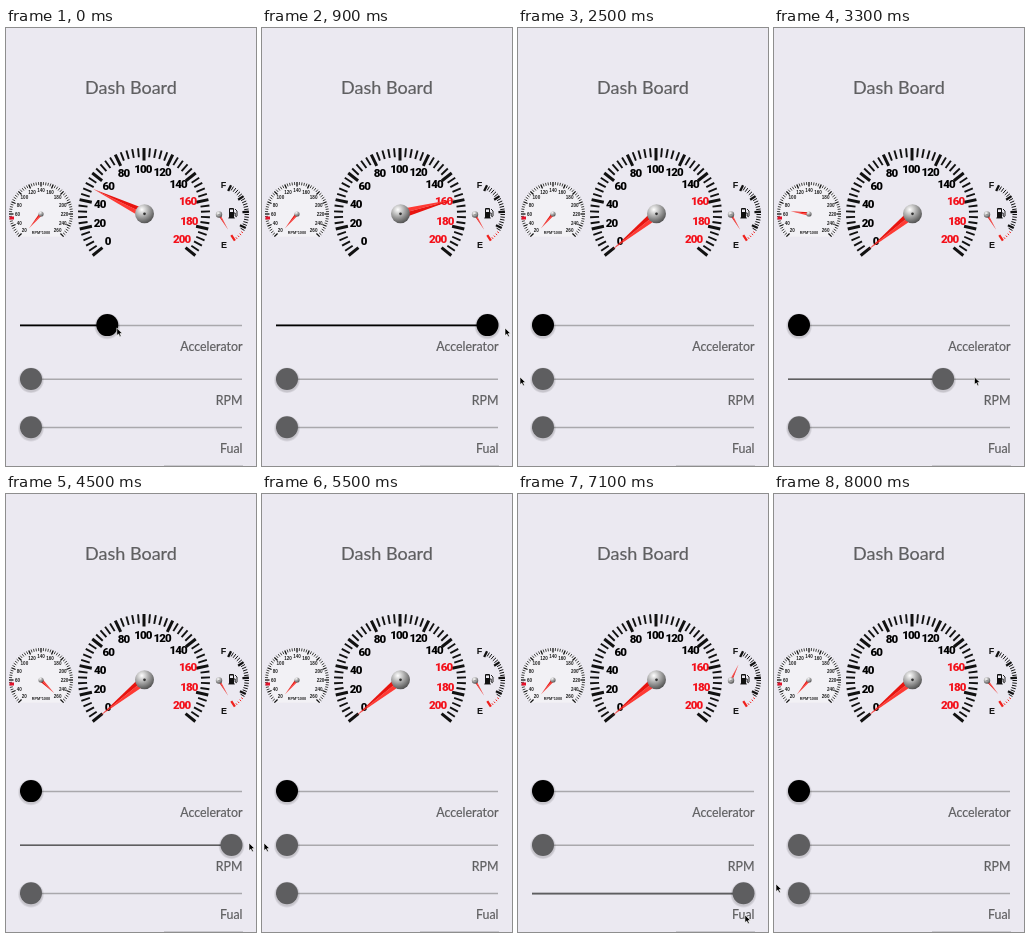
An HTML page that plays this animation: 250 px wide and 438 px high, repeating every 8100 ms.

```html
<!DOCTYPE html>
<html>
<head>
<meta charset="utf-8">
<style>
html, body { margin: 0; height: 100%; overflow: hidden; background: #ebe9f1; }
svg { display: block; width: 100vw; height: 100vh; }
text { font-family: Lato, sans-serif; fill: #5f5f61; }
.title { font-size: 18px; text-anchor: middle; stroke: #5f5f61; stroke-width: .2px; }
.label { font-size: 12.4px; text-anchor: end; stroke: #5f5f61; stroke-width: .2px; }
.num { font: 900 11.5px Roboto, sans-serif; letter-spacing: -.9px; text-anchor: middle; }
.tiny { font: 700 4.6px "Liberation Sans", sans-serif; text-anchor: middle; fill: #222; }
.mark { font: 700 9px "Liberation Sans", sans-serif; text-anchor: middle; fill: #111; }
</style>
</head>
<body>
<svg id="stage" viewBox="0 0 250 438">
  <defs>
    <radialGradient id="metal" cx=".36" cy=".28" r=".8">
      <stop offset="0" stop-color="#fff"/>
      <stop offset=".45" stop-color="#aaa"/>
      <stop offset="1" stop-color="#444"/>
    </radialGradient>
  </defs>
  <text x="125" y="66.3" class="title">Dash Board</text>
  <path d="M158 437.5H237" stroke="#cac9cf"/>
</svg>
<script>
const stage = document.getElementById('stage');
const LOOP = 8100, STEP = 100, RED = '#f0201c';

function add(tag, attrs, text) {
  const el = document.createElementNS('http://www.w3.org/2000/svg', tag);
  for (const k in attrs) el.setAttribute(k, attrs[k]);
  if (text !== undefined) el.textContent = text;
  return stage.appendChild(el);
}

function polar(cx, cy, r, deg) {
  const a = deg * Math.PI / 180;
  return [cx + r * Math.cos(a), cy + r * Math.sin(a)];
}

function tick(cx, cy, r1, r2, deg, width, stroke = '#111') {
  add('path', {
    d: `M${polar(cx, cy, r1, deg)}L${polar(cx, cy, r2, deg)}`,
    stroke, 'stroke-width': width
  });
}

function needle(cx, cy, len, half, hub) {
  const upper = add('path', { d: `M0 ${-half}L${len} 0L0 0Z`, fill: '#ff3a34' });
  const lower = add('path', { d: `M0 ${half}L${len} 0L0 0Z`, fill: '#e8140f' });
  add('circle', { cx, cy, r: hub, fill: 'url(#metal)' });
  add('circle', { cx, cy, r: hub / 7, fill: '#333' });
  return deg => [upper, lower].forEach(p =>
    p.setAttribute('transform', `translate(${cx} ${cy}) rotate(${deg})`));
}

// Speedometer
for (let i = 0; i <= 50; i++) {
  const major = i % 5 === 0;
  tick(138, 186, major ? 53.5 : 57, 66, 141 + i * 5.16, major ? 3 : 1.9);
}
for (let i = 0; i <= 10; i++) {
  const [x, y] = polar(138, 186, 45.5, 143 + i * 25.1);
  add('text', { x, y: y + 4, class: 'num', style: `fill:${i > 7 ? '#f3101a' : '#000'}` }, i * 20);
}

// Rev counter
add('path', { d: `M${polar(35, 186, 32, 135)}A32 32 0 1 1 ${polar(35, 186, 32, 45)}Z`, fill: '#f2f1f5' });
for (let i = 0; i <= 60; i++) {
  tick(35, 186, i % 5 ? 29 : 27.5, 32, 135 + i * 4.5, i % 5 ? .8 : 1.3);
}
for (let i = 0; i <= 12; i++) {
  const [x, y] = polar(35, 186, 23.5, 135 + i * 22.5);
  add('text', { x, y: y + 1.6, class: 'tiny' }, 20 + i * 20);
}
add('text', { x: 35, y: 206, class: 'tiny', style: 'font-size:3.8px' }, 'RPM*1000');
add('path', { d: 'M3.5 190H8', stroke: '#e3122a', 'stroke-width': 3 });

// Fuel gauge
for (let i = 0; i <= 24; i++) {
  const major = i % 6 === 0, low = i > 19;
  tick(211, 186, major ? 25.5 : low ? 30 : 27.5, 32, -64 + i * 5, major ? 2.3 : 1, low ? RED : '#111');
}
add('text', { x: 217.5, y: 159.5, class: 'mark' }, 'F');
add('text', { x: 218, y: 219.5, class: 'mark' }, 'E');
add('path', { d: 'M223 190V181Q223 180 224 180H227Q228 180 228 181V190ZM224 181.5V184H227V181.5Z', fill: '#111', 'fill-rule': 'evenodd' });
add('path', { d: 'M222.3 190H228.8M228 185H229.2V188Q230.5 189.5 231 188V183L229 181', fill: 'none', stroke: '#111', 'stroke-width': .9 });

function slider(y, color, label) {
  add('path', { d: `M14 ${y}H236`, stroke: '#a9a8ac', 'stroke-width': 1.5 });
  const fill = add('path', { stroke: color, 'stroke-width': 1.6 });
  const shadows = [12.8, 11.9].map(r => add('circle', { cy: y + 1, r, opacity: .08 }));
  const knob = add('circle', { cy: y - .3, r: 11, fill: color });
  add('text', { x: 236.5, y: y + 25.6, class: 'label' }, label);
  return level => {
    const x = 25 + 200.5 * level;
    fill.setAttribute('d', `M14 ${y}H${x}`);
    [...shadows, knob].forEach(c => c.setAttribute('cx', x));
  };
}

// drag and swing hold the times of: leaving rest, full, leaving full, rest
const gauges = [
  {
    knob: slider(297.4, '#000', 'Accelerator'), drag: [-430, 700, 1390, 1950],
    turn: needle(138.5, 185.8, 57, 4.8, 9.5), swing: [-420, 1250, 1690, 2400], from: 141, sweep: 258
  },
  {
    knob: slider(351.3, '#5e5e60', 'RPM'), drag: [2750, 3515, 4600, 5050],
    turn: needle(35, 186, 18.5, 1.7, 2.6), swing: [3180, 3740, 4750, 5400], from: 130, sweep: 275
  },
  {
    knob: slider(399.6, '#5e5e60', 'Fual'), drag: [6000, 6700, 7150, 7600],
    turn: needle(213, 186.5, 17.5, 1.2, 3.2), swing: [6250, 7000, 7350, 8050], from: 59, sweep: -124
  }
];

const cursor = add('path', {
  d: 'M0 0V7.6L1.8 6L3.1 8.8L4.4 8.2L3.2 5.5H5.6Z',
  fill: '#000', stroke: '#fff', 'stroke-width': .6
});

const ramp = (t, a, b) => Math.min(1, Math.max(0, (t - a) / (b - a)));
const trip = (t, [a, b, c, d]) => ramp(t, a, b) - ramp(t, c, d);

function draw(now) {
  const t = Math.floor(now % LOOP / STEP) * STEP;
  let reach = 0;
  for (const g of gauges) {
    g.knob(trip(t, g.drag));
    g.turn(g.from + g.sweep * trip(t, g.swing));
    reach += trip(t + 80, g.drag); // the pointer runs ahead of the knob
  }
  const x = 2 + 241 * reach;
  const y = 300 + 49 * ramp(t, 2100, 2500) + 49 * ramp(t, 5600, 5900)
    + 23 * ramp(t, 6400, 7050) - 31 * ramp(t, 7100, 7400);
  cursor.setAttribute('transform', `translate(${x} ${y})`);
}

let start;
function frame(now) {
  start ??= now;
  draw(now - start);
  requestAnimationFrame(frame);
}
draw(0);
requestAnimationFrame(frame);
</script>
</body>
</html>
```
